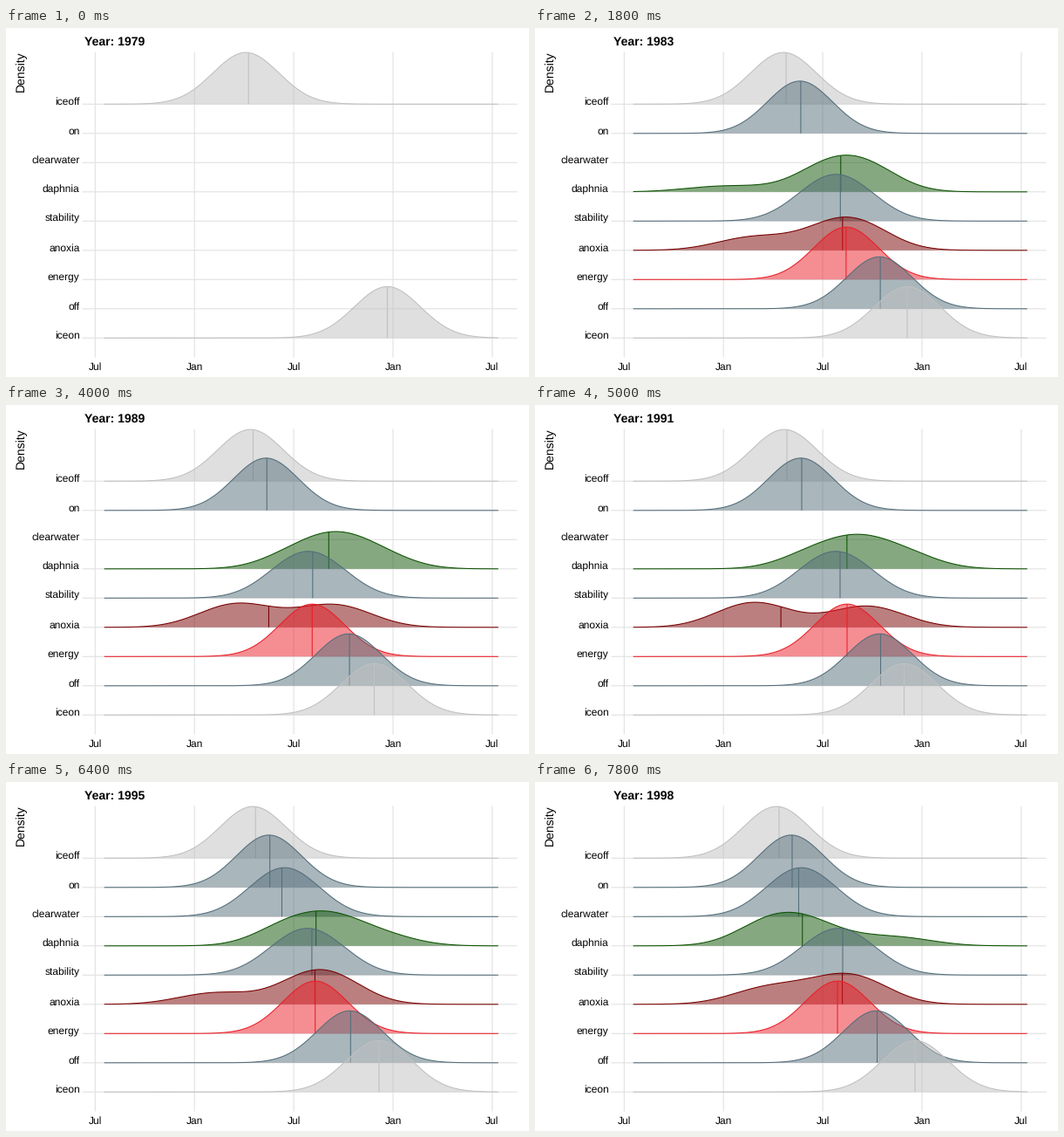
These frames come from a looping animation (600x400 px, 8 s). A matplotlib script:

```python
import numpy as np
import matplotlib.pyplot as plt
from matplotlib.animation import FuncAnimation
from matplotlib.patches import Polygon

W, H, DPI = 600, 400, 100
FRAMES, STEP = 40, 200
PX = 72 / DPI                 # points per pixel
FIRST_YEAR = 1979
TOP, GAP = 86.8, 33.5         # first baseline and row distance
PEAK, BAND = 60.3, 37.0       # height and width of one kernel
X = np.linspace(112.7, 563.7, 452)

GREY, SLATE, GREEN = "#C0C0C0", "#546E7A", "#0D5302"
MAROON, RED, GRID = "#780000", "#EA1F28", "#E1E1E1"

# How late the season runs, in pixels, at a few moments
TURNS = [0, 5, 9, 16, 25, 32, 39]
SEASON = [-7, 0, 4, -6, 5, 2, -5]


def kernel(x, centre):
    return np.exp(-0.5 * ((x - centre) / BAND) ** 2)


def lobe(x, centre, spread):
    """Two equal kernels around a centre."""
    return (kernel(x, centre - spread) + kernel(x, centre + spread)) / 2


def hump(centre, gain=0, bow=0, spread=6, lean=0):
    """One hump that follows the season, or bows over the whole loop."""
    def shape(frame):
        mid = centre + gain * np.interp(frame, TURNS, SEASON)
        mid += bow * (2 * frame / FRAMES - 1) ** 2
        return lambda x: PEAK * lobe(x, mid, spread), mid + lean
    return shape


def twin(spread, early, late, share):
    """Two lobes; share is the weight of the early one."""
    def shape(frame):
        a, b, w = (np.interp(frame, TURNS[1:], v) for v in (early, late, share))
        # the median falls inside the heavier lobe
        at = a + (b - a) * (0.55 - 0.4 * np.tanh(15 * (w - 0.47)))
        return (lambda x: PEAK * (w * lobe(x, a, spread)
                                  + (1 - w) * lobe(x, b, spread)), at)
    return shape


# name, colour, first frame, shape
ROWS = [
    ("iceoff", GREY, 0, hump(281, gain=0.9, spread=7, lean=3)),
    ("on", SLATE, 2, hump(299, gain=1.1, spread=4, lean=1)),
    ("clearwater", SLATE, 32, hump(315, gain=2, spread=14, lean=-3)),
    ("daphnia", GREEN, 2, twin(
        24,
        early=[351, 222, 364, 341, 345, 289],
        late=[392, 357, 404, 403, 412, 404],
        share=[0.70, 0.14, 0.50, 0.53, 0.68, 0.78])),
    ("stability", SLATE, 2, hump(346, gain=-0.3, spread=18, lean=5)),
    ("anoxia", MAROON, 2, twin(
        19,
        early=[251, 252, 276, 251, 241, 270],
        late=[381, 358, 372, 380, 360, 360],
        share=[0.40, 0.29, 0.49, 0.54, 0.25, 0.37])),
    ("energy", RED, 2, hump(352, gain=1.1, spread=3)),
    ("off", SLATE, 2, hump(393, gain=0.4, lean=1)),
    ("iceon", GREY, 0, hump(422, bow=15, spread=8)),
]


class Ridge:
    def __init__(self, ax, index, color, start, shape):
        self.base = TOP + GAP * index
        self.start, self.shape = start, shape
        z = 3 + index
        self.fill = Polygon([(0, 0), (1, 1)], closed=True, facecolor=color,
                            edgecolor="none", alpha=0.5, zorder=z)
        ax.add_patch(self.fill)
        style = dict(color=color, lw=1.07 * PX, zorder=z + 0.1)
        self.curve, = ax.plot([], [], **style)
        self.mark, = ax.plot([], [], solid_capstyle="butt", snap=False, **style)
        self.artists = [self.fill, self.curve, self.mark]

    def draw(self, frame):
        shown = frame >= self.start
        for artist in self.artists:
            artist.set_visible(shown)
        if not shown:
            return
        height, at = self.shape(frame)
        y = self.base - height(X)
        floor = [(X[-1], self.base), (X[0], self.base)]
        self.fill.set_xy(np.vstack([np.column_stack([X, y]), floor]))
        self.curve.set_data(X, y)
        self.mark.set_data([at, at], [self.base, self.base - height(at)])


plt.rcParams["font.family"] = "Liberation Sans"
plt.rcParams["text.hinting"] = "none"
fig = plt.figure(figsize=(W / DPI, H / DPI), dpi=DPI, facecolor="white")
ax = fig.add_axes([0, 0, 1, 1])
ax.set_xlim(-0.5, W - 0.5)
ax.set_ylim(H - 0.5, -0.5)
ax.axis("off")


def label(x, y, text, size=12, **kw):
    return ax.text(x, y, text, fontsize=size * PX, color="black",
                   va="baseline", **kw)


def rule(xs, ys):
    ax.plot(xs, ys, color=GRID, lw=1.07 * PX, zorder=1,
            solid_capstyle="butt", snap=False)


for i in range(5):
    x = 101.8 + 113.9 * i
    rule([x, x], [27, 377])
    label(x, 391, "Jan" if i % 2 else "Jul", ha="center")

ridges = []
for i, (name, color, start, shape) in enumerate(ROWS):
    y = TOP + GAP * i
    rule([87, 586], [y, y])
    label(84, y + 0.6, name, ha="right")
    ridges.append(Ridge(ax, i, color, start, shape))

title = label(90, 19, "", 14, weight="bold")
label(20, 26, "Density", 14, rotation=90, ha="right", rotation_mode="anchor")


def update(frame):
    title.set_text(f"Year: {FIRST_YEAR + frame // 2}")
    for ridge in ridges:
        ridge.draw(frame)
    return [title] + [a for r in ridges for a in r.artists]


anim = FuncAnimation(fig, update, frames=FRAMES, interval=STEP,
                     init_func=lambda: update(0), repeat=True,
                     repeat_delay=0, blit=False)
plt.show()
```
